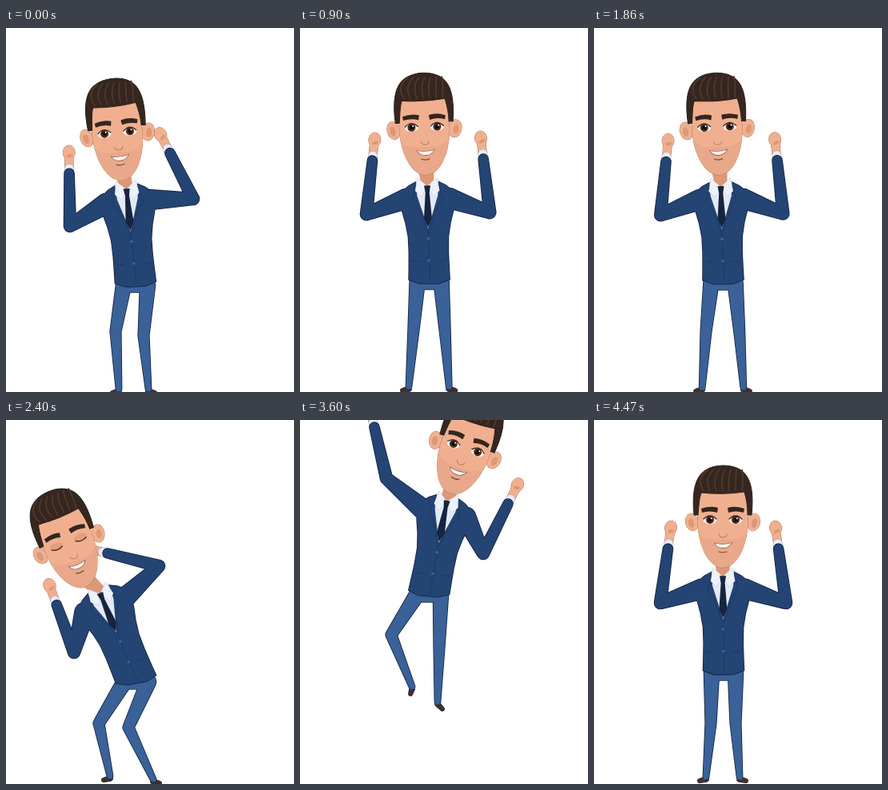
These frames come from a looping animation (360 by 456 pixels, 4.5 s). An HTML page with a canvas:

```html
<!DOCTYPE html>
<html lang="en">
<head>
<meta charset="utf-8">
<title>Victory jump</title>
<style>
  html, body { margin: 0; width: 100%; height: 100%; overflow: hidden; background: #fff; }
  canvas { display: block; width: 360px; height: 456px; }
</style>
</head>
<body>
<canvas id="stage" width="360" height="456"></canvas>
<script>
const ctx = document.getElementById('stage').getContext('2d');
const LOOP = 4500, CYCLE = 1125;
const JACKET = '#244473', TROUSERS = '#3a6198', EDGE = '#14203a';
const SKIN = '#f0b08f', SKIN_DARK = '#dc9877', HAIR = '#35261f';

// head: eye midpoint and tilt in degrees; every other entry is a joint
const stand = {
  head: [161, 125, 0], collar: [161, 189], hip: [162, 315],
  elbowL: [83, 229], cuffL: [93, 157], elbowR: [240, 229], cuffR: [230, 157],
  kneeL: [146, 380], footL: [140, 447], kneeR: [177, 380], footR: [182, 447]
};
const settle = {
  ...stand, head: [153, 124, -3], collar: [158, 192], hip: [161.5, 317],
  elbowL: [83, 235], cuffL: [90, 164], elbowR: [236, 232], cuffR: [228, 161],
  kneeL: [140, 380], footL: [135, 450], kneeR: [182, 380], footR: [187, 450]
};
const sway = {
  ...stand, head: [139, 131, -6], collar: [150, 195], hip: [162, 320],
  elbowL: [80, 248], cuffL: [79, 178], elbowR: [234, 214], cuffR: [203, 153],
  kneeL: [137, 380], footL: [141, 452], kneeR: [172, 385], footR: [178, 452]
};
const lean = {
  head: [78, 153, -21], collar: [115, 211], hip: [163, 326],
  elbowL: [85, 291], cuffL: [62, 228], elbowR: [191, 183], cuffR: [123, 166],
  kneeL: [116, 380], footL: [130, 446], kneeR: [153, 385], footR: [184, 450]
};
const rise = {
  head: [188, 46, 12], collar: [173, 107], hip: [161, 233],
  elbowL: [94, 105], cuffL: [76, 36], elbowR: [235, 173], cuffR: [248, 101],
  kneeL: [114, 284], footL: [138, 351], kneeR: [170, 300], footR: [172, 369]
};
const air = {
  head: [207, 35, 19], collar: [185, 95], hip: [161, 217],
  elbowL: [108, 73], cuffL: [92, 5], elbowR: [229, 167], cuffR: [262, 101],
  kneeL: [114, 269], footL: [140, 334], kneeR: [174, 285], footR: [172, 353]
};
const fall = {
  head: [206, 88, 17], collar: [183, 147], hip: [161, 270],
  elbowL: [108, 127], cuffL: [118, 58], elbowR: [250, 203], cuffR: [271, 133],
  kneeL: [134, 333], footL: [141, 403], kneeR: [177, 335], footR: [176, 403]
};

const mapPose = fn => Object.fromEntries(Object.keys(stand).map(k => [k, stand[k].map((_, i) => fn(k, i))]));
const blend = (a, b, t, dx, dy) =>
  mapPose((k, i) => a[k][i] + (b[k][i] - a[k][i]) * t + [dx, dy, 0][i]);

const keys = [
  [-40, stand], [0, sway], [150, lean], [235, rise], [265, air],
  [350, blend(air, fall, .35, 5, -26)], [480, fall], [540, blend(fall, stand, .55, 0, 18)],
  [787, settle], [1085, stand], [CYCLE, sway], [CYCLE + 150, lean]
];

// the four jumps run at slightly different speeds
const tempo = [
  [0, 0], [1110, 1105], [1380, 1360], [1620, 1645], [2220, 2225], [2400, 2400], [2450, 2405],
  [2760, 2750], [3330, 3355], [3600, 3640], [3870, 3850], [4470, 4460], [LOOP, 4485]
];

function warp(t) {
  const n = tempo.findIndex(p => p[0] > t);
  const [a, b] = [tempo[n - 1], tempo[n]];
  return a[1] + (b[1] - a[1]) * (t - a[0]) / (b[0] - a[0]);
}

// monotone cubic between keys: no stops on a moving part, no overshoot
function poseAt(phase) {
  const n = keys.findIndex(k => k[0] > phase);
  const h = keys[n][0] - keys[n - 1][0], s = (phase - keys[n - 1][0]) / h;
  return mapPose((name, i) => {
    const v = m => keys[m][1][name][i];
    const slope = m => (v(m + 1) - v(m)) / (keys[m + 1][0] - keys[m][0]);
    const tangent = m => {
      const a = slope(m - 1), b = slope(m);
      return a * b <= 0 ? 0 : 2 * a * b / (a + b);
    };
    const p = v(n - 1), q = v(n);
    return p + (q - p) * s * s * (3 - 2 * s)
      + h * s * (1 - s) * (tangent(n - 1) * (1 - s) - tangent(n) * s);
  });
}

// tapered capsule
function limb(path, a, b, ra, rb) {
  const t = Math.atan2(b[1] - a[1], b[0] - a[0]), q = Math.PI / 2;
  const part = new Path2D();
  part.arc(a[0], a[1], ra, t + q, t + 3 * q);
  part.arc(b[0], b[1], rb, t - q, t + q);
  part.closePath();
  path.addPath(part);
}

function paint(path, fill, edge, width = 1.6) {
  if (edge) {
    ctx.strokeStyle = edge;
    ctx.lineWidth = width;
    ctx.stroke(path);
  }
  ctx.fillStyle = fill;
  ctx.fill(path);
}

function line(d, color, width) {
  ctx.strokeStyle = color;
  ctx.lineWidth = width;
  ctx.stroke(new Path2D(d));
}

const ellipse = (x, y, rx, ry, angle = 0) => {
  const p = new Path2D();
  p.ellipse(x, y, rx, ry, angle, 0, 2 * Math.PI);
  return p;
};

function polygon(points) {
  const p = new Path2D();
  points.forEach(q => p.lineTo(q[0], q[1]));
  p.closePath();
  return p;
}

function drawLegs(p) {
  const legs = new Path2D(), lift = Math.max(0, (315 - p.hip[1]) / 95);
  const hipAt = side => [p.hip[0] + side * 15, p.hip[1] + 2];
  limb(legs, hipAt(-1), hipAt(1), 9, 9);
  for (const [side, knee, foot] of [[-1, p.kneeL, p.footL], [1, p.kneeR, p.footR]]) {
    const out = side < 0 ? -8 + 6 * lift : 8 - 2 * lift;
    const shoe = new Path2D();
    limb(shoe, [foot[0], foot[1] + 3], [foot[0] + out, foot[1] + 5 + 4 * lift], 3.4, 2.6);
    paint(shoe, '#40302d', '#1d1718', 1);
    paint(ellipse(foot[0], foot[1] + 1, 3.6, 3), '#dfe5ef');
    limb(legs, hipAt(side), knee, 9.5, 6.8);
    limb(legs, knee, foot, 6.8, 3.6);
  }
  paint(legs, TROUSERS, EDGE);
}

function drawHand(elbow, cuff) {
  const d = Math.hypot(cuff[0] - elbow[0], cuff[1] - elbow[1]);
  const u = [(cuff[0] - elbow[0]) / d, (cuff[1] - elbow[1]) / d];
  const along = n => [cuff[0] + u[0] * n, cuff[1] + u[1] * n];
  const fist = along(22), angle = Math.atan2(u[1], u[0]);
  const hand = new Path2D();
  limb(hand, cuff, fist, 5, 5.5);
  hand.addPath(ellipse(fist[0], fist[1], 9, 7.5, angle));
  paint(hand, SKIN, '#a86f58', 1);
  const thumb = along(18);
  paint(ellipse(thumb[0] + 1, thumb[1], 4, 2, angle + 1.2), SKIN_DARK);
  const sleeve = new Path2D();
  limb(sleeve, along(-3), along(2), 5.5, 5.5);
  paint(sleeve, '#e8edf7', '#8d99b2', .8);
}

function drawBody(p) {
  const tilt = Math.atan2(p.collar[0] - p.hip[0], p.hip[1] - p.collar[1]);
  // u runs across the torso, v from hem (0) to collar (1)
  const at = (u, v) => {
    const a = tilt * (.5 + .5 * v);
    return [0, 1].map(i => p.hip[i] + (p.collar[i] - p.hip[i]) * v + u * (i ? Math.sin(a) : Math.cos(a)));
  };
  const shape = list => polygon(list.map(q => at(q[0], q[1])));

  drawHand(p.elbowL, p.cuffL);
  drawHand(p.elbowR, p.cuffR);

  const half = [[11, 1], [23, .95], [32, .89], [35, .82], [32, .7], [28, .58], [25, .44], [24.5, .28], [25, .12], [25.5, .01]];
  const mirror = half.map(([u, v]) => [-u, v]).reverse();
  const suit = shape([...half, [12, -.03], [-12, -.03], ...mirror]);
  for (const [side, elbow, cuff] of [[-1, p.elbowL, p.cuffL], [1, p.elbowR, p.cuffR]]) {
    limb(suit, at(side * 27, .82), elbow, 12.5, 7.5);
    const end = [0, 1].map(i => cuff[i] + (elbow[i] - cuff[i]) * .06);
    limb(suit, elbow, end, 7.5, 6);
  }
  paint(suit, JACKET, EDGE);

  ctx.lineWidth = 1;
  ctx.strokeStyle = '#1e3b69';
  for (const side of [-1, 1]) {
    ctx.stroke(shape([[side * 14, .98], [side * 19, .8], [side * 13, .75], [0, .48], [side * 13, .75], [side * 19, .8]]));
    ctx.stroke(shape([[side * 12, .19], [side * 21, .2]]));
  }
  ctx.stroke(shape([[0, .5], [1, 0]]));
  for (const v of [.42, .2]) paint(ellipse(...at(0, v), 1.8, 1.8), '#426096');

  paint(shape([[-14, 1.01], [14, 1.01], [13, .85], [0, .52], [-13, .85]]), '#e4eaf5');
  const a = p.head[2] * Math.PI / 180;
  const neck = new Path2D();
  limb(neck, [p.head[0] - Math.sin(a) * 42, p.head[1] + Math.cos(a) * 42], at(0, .98), 11, 8);
  paint(neck, SKIN_DARK);
  for (const side of [-1, 1])
    paint(shape([[side * 12, 1.03], [side * 15, .9], [side * 8, .84], [0, .94]]), '#edf1f9', '#b8c2d6', .8);
  paint(shape([[-4, .95], [4, .95], [2.5, .88], [5, .62], [0, .53], [-5, .62], [-2.5, .88]]), '#17243f');
}

function drawHead([x, y, degrees], asleep) {
  ctx.save();
  ctx.translate(x, y);
  ctx.rotate(degrees * Math.PI / 180);
  for (const side of [-1, 1]) {
    paint(ellipse(side * 38.5, 3, 8, 11, side * .2), SKIN, '#ae7860', 1);
    paint(ellipse(side * 39.5, 4, 3.5, 6, side * .2), SKIN_DARK);
  }
  const face = new Path2D('M-32-38L-31 8C-29 34-18 59 0 60C18 59 29 34 31 8L32-38Z');
  paint(face, SKIN, '#b57c63', 1);
  paint(new Path2D('M-29 18C-24 44-14 59 0 60C14 59 24 44 29 18C20 26 10 25 0 25C-10 25-20 26-29 18Z'), 'rgba(176,118,94,.13)');

  paint(new Path2D('M-36-6C-40-48-30-67 0-68C32-68 40-46 36-6L31-6C31-20 29-27 27-35Q0-31-27-34C-30-26-30-16-31-6Z'), HAIR, '#211712', 1);
  for (let i = -3; i <= 3; i++)
    line(`M${i * 8}-36Q${i * 10 - 4}-52 ${i * 7 + 3}-63`, '#4f382d', 1.8);

  ctx.lineCap = 'round';
  for (const side of [-1, 1]) {
    const ex = side * 16;
    paint(new Path2D(`M${ex - side * 10}-15Q${ex}-18 ${ex + side * 11}-14L${ex + side * 10}-9Q${ex}-12 ${ex - side * 9}-9Z`), HAIR);
    if (asleep) {
      paint(ellipse(ex, 0, 8.5, 5), '#e3a07f');
      line(`M${ex - 7} 2Q${ex} 6 ${ex + 7} 2`, '#4a3028', 1.5);
    } else {
      paint(ellipse(ex, 0, 8.5, 5.3), '#f8eee8');
      paint(ellipse(ex, 0, 5, 5), '#4a2c20');
      paint(ellipse(ex, 0, 2.6, 2.6), '#160e0c');
      paint(ellipse(ex + 1.8, -1.8, 1, 1), '#fff');
      line(`M${ex - 8}-1Q${ex}-9 ${ex + 8}-1`, '#3a251e', 1.3);
    }
  }
  line('M-5 18Q-4 22 0 22Q5 22 5 18', '#c98a6d', 1.4);
  paint(new Path2D('M-10 29.5Q0 32 11 29Q7 35.5 0 35Q-7 35-10 29.5Z'), '#f6f1ee', '#7d4a3d', 1.2);
  line('M-5 40Q0 42 5 40', '#d0917', 1.2);
  ctx.restore();
}

function render(now) {
  const t = Math.floor((now % LOOP) / 30) * 30;
  const phase = warp(t) % CYCLE, pose = poseAt(phase);
  ctx.fillStyle = '#fff';
  ctx.fillRect(0, 0, 360, 456);
  drawLegs(pose);
  drawBody(pose);
  drawHead(pose.head, phase > 80 && phase < 190);
}

let start;
function tick(now) {
  start ??= now;
  render(now - start);
  requestAnimationFrame(tick);
}
render(0);
requestAnimationFrame(tick);
</script>
</body>
</html>
```
